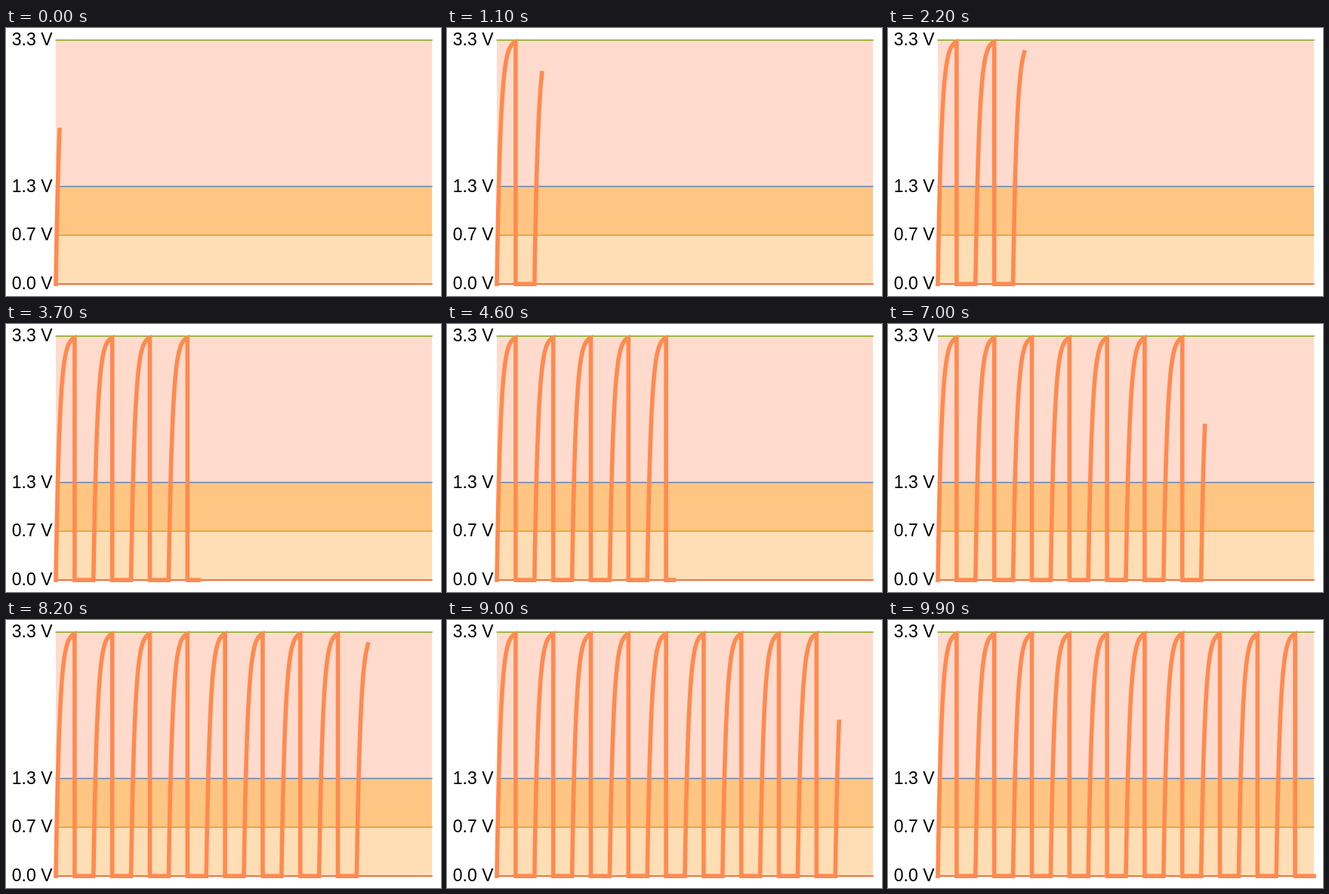
These frames come from a looping animation (576 px wide and 356 px high, 10000 ms). An HTML page:

```html
<!DOCTYPE html>
<html lang="en">
<head>
<meta charset="utf-8">
<title>Charging pulses</title>
<style>
  html, body { margin: 0; width: 100%; height: 100%; overflow: hidden; background: #fff; }
  svg { display: block; }
  text { font: 23px "Liberation Sans", Arial, sans-serif; text-anchor: end; }
</style>
</head>
<body>
<svg width="576" height="356" viewBox="0 0 576 356">
  <g id="plot"></g>
  <path id="wave" fill="none" stroke="#ff8a4f" stroke-width="5.6"
        stroke-linecap="square" stroke-linejoin="miter" stroke-miterlimit="4"/>
</svg>
<script>
const LEFT = 66, WIDTH = 498, BASE = 340.1, HEIGHT = 324;
const STEPS = 100, STEP_MS = 100, DX = WIDTH / STEPS;
const HALF = 5, PERIOD = 10; // in steps; the time constant is one step

const plot = document.getElementById("plot");
const wave = document.getElementById("wave");
const px = s => LEFT + s * DX;
const py = v => BASE - v * HEIGHT;

function add(name, attrs, text = "") {
  const el = document.createElementNS("http://www.w3.org/2000/svg", name);
  for (const key in attrs) el.setAttribute(key, attrs[key]);
  el.textContent = text;
  plot.append(el);
}

const bands = [[0, 0.2, "#ffddb5"], [0.2, 0.4, "#ffc582"], [0.4, 1, "#ffdbce"]];
for (const [low, high, fill] of bands) {
  add("rect", { x: LEFT, y: py(high), width: WIDTH, height: (high - low) * HEIGHT, fill });
}

const levels = [
  [0, "0.0 V", "#eb6235"], [0.2, "0.7 V", "#e19c24"],
  [0.4, "1.3 V", "#5e81b5"], [1, "3.3 V", "#8fb032"]
];
for (const [v, label, stroke] of levels) {
  add("line", { x1: LEFT - 0.5, x2: LEFT + WIDTH + 0.7, y1: py(v), y2: py(v), stroke, "stroke-width": 1.6 });
  add("text", { x: 61.5, y: Math.round(py(v) + 7) }, label);
}

function wavePath(end) {
  const pts = [];
  const point = (s, v) => pts.push(px(s).toFixed(2) + " " + py(v).toFixed(2));
  for (let start = 0; start < end; start += PERIOD) {
    const rise = Math.min(HALF, end - start);
    const n = Math.ceil(rise * 8);
    for (let i = 0; i <= n; i++) {
      const s = rise * i / n;
      point(start + s, 1 - Math.exp(-s));
    }
    if (end > start + HALF) {
      point(start + HALF, 0);
      point(Math.min(end, start + PERIOD), 0);
    }
  }
  return "M" + pts.join("L");
}

let shown = -1;
const t0 = performance.now();
function frame(now) {
  const step = Math.floor(Math.max(0, now - t0) / STEP_MS) % STEPS;
  if (step !== shown) {
    shown = step;
    wave.setAttribute("d", wavePath(step + 1));
  }
  requestAnimationFrame(frame);
}
frame(t0);
</script>
</body>
</html>
```
